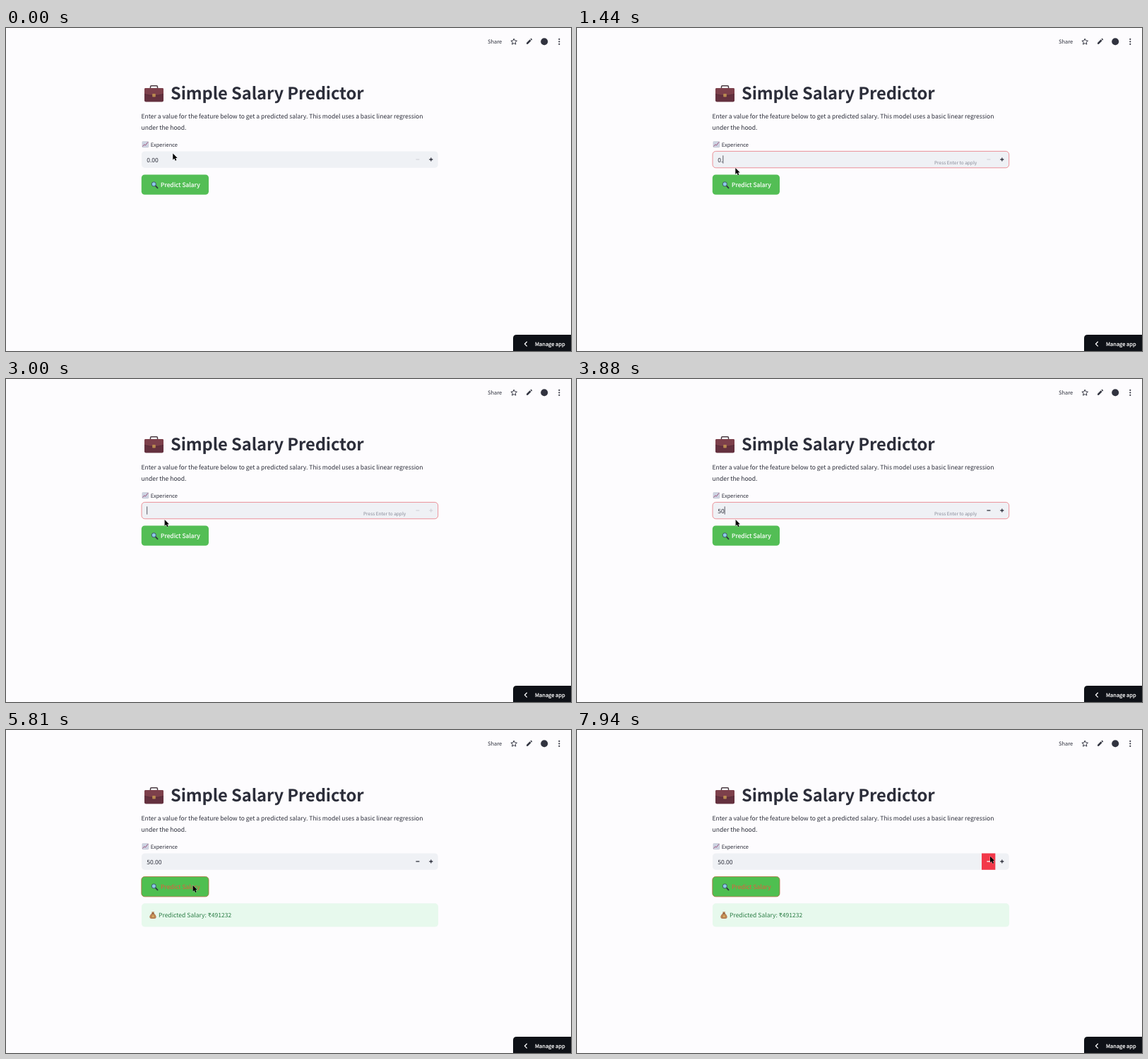
Write an HTML page that moves like this. It is 800 by 457 pixels and loops after 8000 ms.

```html
<!DOCTYPE html>
<html lang="en">
<head>
<meta charset="utf-8">
<title>Simple Salary Predictor</title>
<style>
  html, body { margin: 0; width: 100%; height: 100%; overflow: hidden; background: #fdfcfe; }
  svg { display: block; width: 100vw; height: 100vh; }
  text {
    font: 8.56px "Noto Sans CJK JP", "Noto Sans CJK SC", Lato, sans-serif;
    fill: #2c2e3a; white-space: pre; text-rendering: geometricPrecision;
  }
  text.title { font-size: 23.75px; font-weight: 700; letter-spacing: -.005em; }
  text.small { font-size: 7.5px; }
  text.hint { font-size: 6.5px; fill: #858896; }
  text.light { fill: #fff; stroke: #fff; stroke-width: .2; }
  .step { stroke: #31333f; stroke-width: 1.3; fill: none; }
  .step.disabled { stroke: #cdced5; stroke-width: 1; }
  .step.hover { stroke: #fff; }
  .focused { stroke: #e8787f; stroke-width: .8; }
  #button rect { fill: #53be55; }
  #button.active rect { fill: #4fbf50; stroke: #b0703f; stroke-width: .8; }
  #button.active text { fill: #e8583f; stroke: none; }
</style>
</head>
<body>
<svg viewBox="0 0 800 457">
  <rect width="800" height="457" fill="#fdfcfe"/>

  <!-- Toolbar -->
  <text class="small" x="682" y="22">Share</text>
  <path id="star" fill="none" stroke="#31333f" stroke-width="1" stroke-linejoin="round"/>
  <path d="M737 22.8V20.9L741.7 16.2L743.6 18.1L738.9 22.8ZM742.4 15.5L743.2 14.8Q743.6 14.5 744 14.9L744.9 15.8Q745.2 16.2 744.9 16.6L744.3 17.4Z" fill="#31333f"/>
  <circle cx="762.2" cy="19.2" r="5" fill="#31333f"/>
  <g fill="#31333f">
    <circle cx="783.3" cy="15.8" r="1.1"/><circle cx="783.3" cy="19.3" r="1.1"/><circle cx="783.3" cy="22.8" r="1.1"/>
  </g>

  <!-- Briefcase and heading -->
  <path d="M204.5 86V83.2Q204.5 81.7 206 81.7H213Q214.5 81.7 214.5 83.2V86" fill="none" stroke="#4a3a42" stroke-width="1.5"/>
  <rect x="196" y="85" width="27" height="19.6" rx="2" fill="#64313f"/>
  <path d="M196 87Q196 85 198 85H221Q223 85 223 87V93.5Q209.5 97.5 196 93.5Z" fill="#7d404b"/>
  <path d="M196 93.5Q209.5 97.5 223 93.5" fill="none" stroke="#522a36" stroke-width=".8"/>
  <rect x="207.2" y="93" width="4.6" height="4.4" rx=".7" fill="#b98a50"/>
  <text class="title" x="233" y="101">Simple Salary Predictor</text>

  <text x="191.5" y="128.3">Enter a value for the feature below to get a predicted salary. This model uses a basic linear regression</text>
  <text x="191.5" y="143.6">under the hood.</text>

  <!-- Label with chart -->
  <rect x="193" y="160.7" width="8.6" height="8" rx=".6" fill="#d5d9e6" stroke="#a4aabc" stroke-width=".5"/>
  <path d="M193.3 163.3H201.3M193.3 166H201.3M196 161V168.5M198.7 161V168.5" stroke="#b9c3d8" stroke-width=".4"/>
  <path d="M193.4 167.6L195.7 164.9L197.3 166L201.2 161.2" fill="none" stroke="#a0597e" stroke-width="1"/>
  <text class="small" x="204.8" y="167.6">Experience</text>

  <!-- Number field -->
  <rect id="field" x="192" y="174.4" width="419.7" height="23.4" rx="4.6" fill="#eff1f5"/>
  <text id="value" x="199.2" y="189.5"></text>
  <path id="caret" d="M0 180.4V191.6" stroke="#31333f" stroke-width=".8"/>
  <text id="hint" class="hint" x="506" y="193.3">Press Enter to apply</text>
  <rect id="minusFill" x="573" y="174.5" width="19.3" height="23.3" fill="#f2384a"/>
  <path id="minus" class="step" d="M580.4 186H585.4"/>
  <path id="plus" class="step" d="M599.3 186H604.3M601.8 183.5V188.5"/>

  <!-- Button with magnifier -->
  <g id="button">
    <rect x="191.8" y="207.5" width="95.2" height="28.3" rx="4.6"/>
    <path d="M211.8 223.4L214.6 226.3" stroke="#2d3640" stroke-width="1.7" stroke-linecap="round"/>
    <circle cx="209.3" cy="220.9" r="3.1" fill="#8cc8e8" stroke="#37505f" stroke-width=".9"/>
    <text class="light" x="219" y="225.3">Predict Salary</text>
  </g>

  <!-- Result with money bag -->
  <g id="result">
    <rect x="192" y="245.3" width="420" height="33.3" rx="4.6" fill="#e7f9ed"/>
    <path d="M206.1 257.2L207 258.9Q203 262 203.3 265Q203.6 266.9 206 266.9H210Q212.4 266.9 212.7 265Q212.9 262 209 258.9L210.2 257.2Z" fill="#b98255"/>
    <path d="M206.4 259.3H209.7" stroke="#7a4a2c" stroke-width="1"/>
    <circle cx="208.2" cy="263.6" r="1.5" fill="#d9b45f"/>
    <text x="216" y="265.3" style="fill:#2b7d45">Predicted Salary: ₹491232</text>
  </g>

  <!-- Manage bar -->
  <path d="M718 457V439Q718 434 723 434H800V457Z" fill="#0e1117"/>
  <path d="M737.7 443.8L734.5 447.1L737.7 450.4" fill="none" stroke="#fff" stroke-width="1.3"/>
  <text class="small light" x="749" y="450">Manage app</text>

  <path id="cursor" d="M0 0V9L2.1 7.1L3.5 10.3L5.1 9.6L3.7 6.5H6.4Z" fill="#000" stroke="#fff" stroke-width=".5" paint-order="stroke"/>
</svg>
<script>
const LOOP = 8000, FOCUS = 600, CLICK = 5400, RESULT = 5600, BLINK = 530;

// [start, end, x, y]: the pointer eases to (x, y) within the interval
const moves = [
  [0, 0, 236.3, 177.5], [150, 550, 220.6, 185.4], [1150, 1500, 224.6, 199],
  [4150, 4850, 264.6, 214.3], [5100, 5350, 264.6, 219.7], [6500, 7500, 585, 178.7],
];
// [time, field content]
const edits = [
  [0, "0.00"], [1150, "0.0"], [1300, "0."], [1450, "0"], [1600, ""],
  [3100, "5"], [3450, "50"], [CLICK, "50.00"],
];

const el = id => document.getElementById(id);
const show = (id, on) => { el(id).style.display = on ? "" : "none"; };
const within = (v, lo, hi) => v >= lo && v <= hi;

el("star").setAttribute("d", "M" + Array.from({ length: 10 }, (_, i) => {
  const r = i % 2 ? 2.1 : 4.5, a = i * Math.PI / 5;
  return `${719.2 + r * Math.sin(a)} ${19.5 - r * Math.cos(a)}`;
}).join("L") + "Z");

function pointerAt(t) {
  let [, , x, y] = moves[0];
  for (const [start, end, toX, toY] of moves.slice(1)) {
    if (t < start) break;
    const p = Math.min(1, (t - start) / (end - start));
    const k = p * p * (3 - 2 * p);
    x += (toX - x) * k;
    y += (toY - y) * k;
  }
  return [x, y];
}

function draw(t) {
  const [x, y] = pointerAt(t);
  el("cursor").setAttribute("transform", `translate(${x} ${y})`);

  const [editTime, content] = edits.findLast(([time]) => t >= time);
  const focused = t >= FOCUS && t < CLICK;
  const overMinus = within(x, 573, 592) && within(y, 174, 198);
  const overButton = within(x, 192, 287) && within(y, 208, 236);

  el("value").textContent = content;
  el("field").setAttribute("class", focused ? "focused" : "");
  show("hint", focused && editTime > 0);

  const blinkPhase = Math.floor((t - Math.max(FOCUS, editTime)) / BLINK);
  show("caret", focused && blinkPhase % 2 === 0);
  const width = content ? el("value").getComputedTextLength() : 0;
  el("caret").setAttribute("transform", `translate(${199.7 + width} 0)`);

  show("minusFill", overMinus);
  el("minus").setAttribute("class", "step" + (overMinus ? " hover" : Number(content) > 0 ? "" : " disabled"));
  el("plus").setAttribute("class", "step" + (content ? "" : " disabled"));

  el("button").setAttribute("class", overButton || t >= CLICK ? "active" : "");
  show("result", t >= RESULT);
}

const origin = performance.now();
function tick() {
  draw((performance.now() - origin) % LOOP);
  requestAnimationFrame(tick);
}
tick();
</script>
</body>
</html>
```
